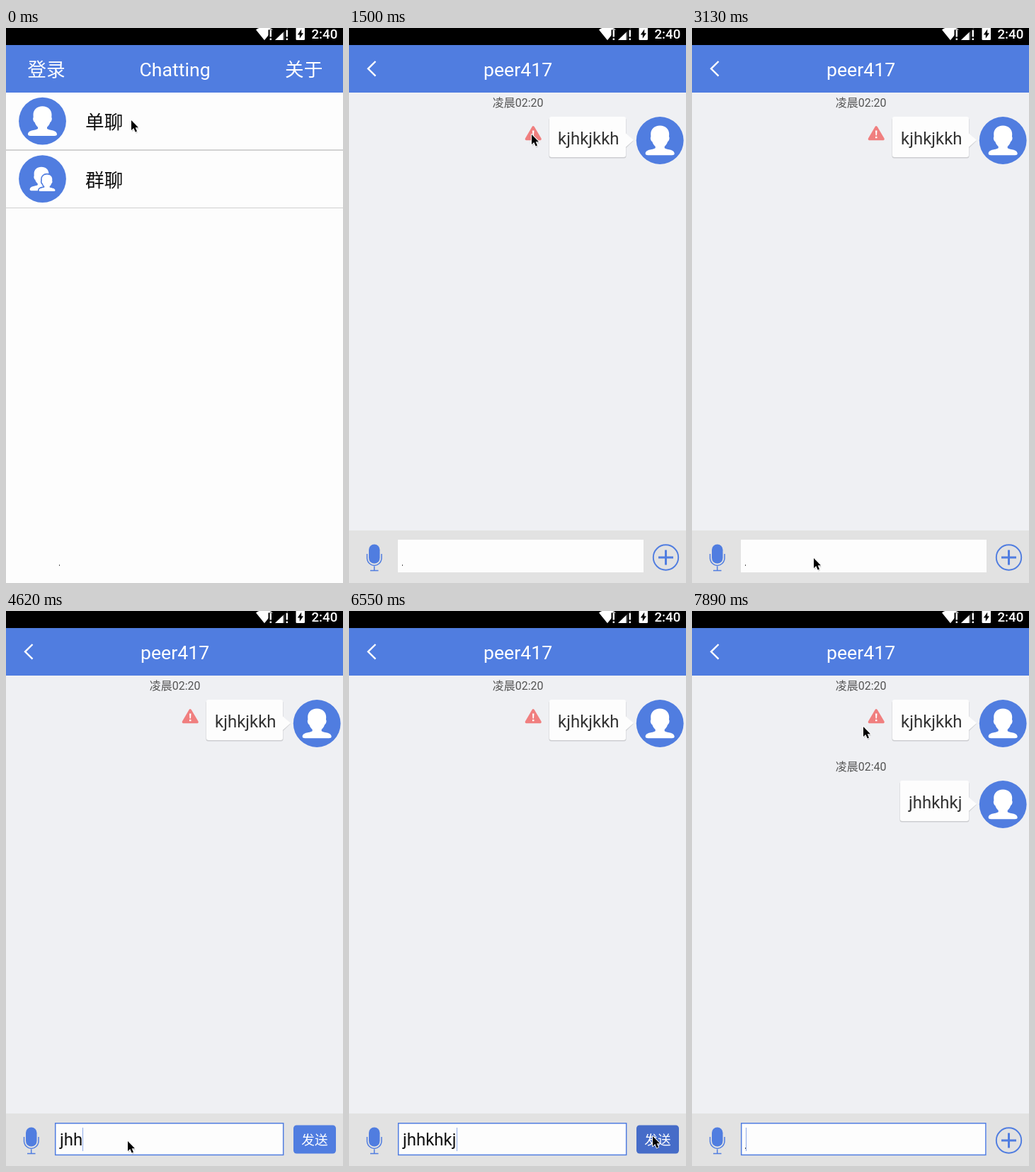
An HTML page for the animation above (8000 ms loop, 476x782 px).

```html
<!DOCTYPE html>
<html lang="zh-CN">
<head>
<meta charset="utf-8">
<title>Chatting</title>
<style>
:root { --blue: #507de0; }
html, body { margin: 0; width: 100%; height: 100%; overflow: hidden; background: #000; }
body { position: relative; font-family: Roboto, "Noto Sans CJK SC", "Noto Sans CJK", sans-serif; }
svg { position: absolute; left: 0; top: 0; display: block; }
.blue { fill: var(--blue); }
.line { fill: none; stroke: var(--blue); }
.white { fill: #fff; }
.big { font-size: 26.67px; }
.msg { font-size: 24px; fill: #333; }
.time { font-size: 16px; fill: #555; }
.mid { text-anchor: middle; }

/* 1% = 80 ms; every change is a hard step */
.anim, #typed { animation: 8s step-end -10ms infinite; }
#chat { animation-name: open; }
#wait { animation-name: wait; }
#name { animation-name: name; }
#focus { animation-name: focus; }
#plus { animation-name: plus; }
#send { animation-name: send; }
#press { animation-name: press; }
#sent { animation-name: sent; }
#mouse { animation-name: mouse; }

#typed {
  position: absolute; left: 73px; top: 728px; height: 33px; padding-left: 3px;
  overflow: hidden; white-space: nowrap;
  font-size: 24px; line-height: 35px; color: #111;
  border-right: 1px solid #8eabe9;
  animation-name: type, caret;
}

@keyframes open {
  0% { opacity: 0; transform: translateY(11px); }
  11.25% { opacity: .95; transform: translateY(11px); }
  13.125% { opacity: 1; transform: none; }
}
@keyframes wait { 0% { opacity: 1; } 13.125% { opacity: 0; } }
@keyframes name { 0% { opacity: 0; } 13.125% { opacity: 1; } }
@keyframes focus { 0% { opacity: 0; } 42.875% { opacity: 1; } }
@keyframes plus { 0% { opacity: 1; } 55.875% { opacity: 0; } 83.75% { opacity: 1; } }
@keyframes send { 0% { opacity: 0; } 55.875% { opacity: 1; } 83.75% { opacity: 0; } }
@keyframes press { 0% { fill: #507de0; } 81.875% { fill: #466cc8; } 83.75% { fill: #507de0; } }
@keyframes sent { 0% { opacity: 0; } 83.75% { opacity: 1; } }
@keyframes type {
  0% { width: 0; }
  55.875% { width: .79em; }
  57.75% { width: 1.345em; }
  59.625% { width: 1.85em; }
  61.375% { width: 2.905em; }
  63.25% { width: 3.15em; }
  83.75% { width: 0; }
}
@keyframes caret {
  0% { border-color: transparent; }
  42.875% { border-color: #8eabe9; }
  48.5% { border-color: transparent; }
  55.875% { border-color: #8eabe9; }
  68.875% { border-color: transparent; }
  76.25% { border-color: #8eabe9; }
  93.125% { border-color: transparent; }
  96.875% { border-color: #8eabe9; }
}
@keyframes mouse {
  0% { transform: translate(177px, 130px); }
  15% { transform: translate(200px, 135px); }
  16.875% { transform: translate(244px, 147px); }
  18.75% { transform: translate(258px, 150px); }
  26.125% { transform: translate(258px, 155px); }
  28% { transform: translate(258px, 800px); }
  31.625% { transform: translate(194px, 772px); }
  33.5% { transform: translate(182px, 752px); }
  35.375% { transform: translate(176px, 738px); }
  37.25% { transform: translate(173px, 743px); }
  39.125% { transform: translate(172px, 747px); }
  70.75% { transform: translate(205px, 738px); }
  72.625% { transform: translate(300px, 724px); }
  74.5% { transform: translate(390px, 722px); }
  76.25% { transform: translate(425px, 735px); }
  78.125% { transform: translate(429px, 740px); }
  85.625% { transform: translate(404px, 640px); }
  87.5% { transform: translate(310px, 390px); }
  89.375% { transform: translate(241px, 235px); }
  93.125% { transform: translate(240px, 208px); }
  95% { transform: translate(240px, 182px); }
  96.875% { transform: translate(241px, 168px); }
  98.625% { transform: translate(242px, 163px); }
}
</style>
</head>
<body>
<svg width="476" height="782" viewBox="0 0 476 782">
  <defs>
    <path id="person" d="M0-21C8-21 13-16 13-9C13-7 12.6-6 13-5C14-3 12.6 1 11 1.5C10 5 8 7 6.5 8.5V10.5C8 13 20.5 12 20.5 18.5C20.5 20 19 20.7 17 20.7H-17C-19 20.7-20.5 20-20.5 18.5C-20.5 12-8 13-6.5 10.5V8.5C-8 7-10 5-11 1.5C-12.6 1-14-3-13-5C-12.6-6-13-7-13-9C-13-16-8-21 0-21Z"/>
    <g id="avatar">
      <circle class="blue" r="33.4"/>
      <use href="#person" class="white"/>
    </g>
    <g id="side">
      <path d="M391 148.500L402 159L391 169.500Z" fill="#d3d4d7"/>
      <path d="M390 147.500L402 158L390 168.500Z" fill="#fdfdfd"/>
      <use href="#avatar" x="439.200" y="158.500"/>
    </g>
  </defs>

  <!-- list screen -->
  <g id="list">
    <rect width="476" height="782" fill="#fdfdfd"/>
    <rect class="blue" y="24" width="476" height="67"/>
    <g class="big white">
      <text x="30.300" y="68">登录</text>
      <text class="mid" x="238.600" y="68">Chatting</text>
      <text x="394" y="68">关于</text>
    </g>
    <g class="big" fill="#111">
      <text x="112" y="142">单聊</text>
      <text x="112" y="223.500">群聊</text>
    </g>
    <rect y="171" width="476" height="2" fill="#d2d2d2"/>
    <rect y="253" width="476" height="1" fill="#cfcfcf"/>
    <use href="#avatar" x="51.500" y="131.200"/>
    <g transform="translate(51.500 212.600)">
      <circle class="blue" r="33.400"/>
      <use href="#person" class="white" transform="translate(-1.500 0) scale(.8)"/>
      <g transform="translate(6.500 5.700) scale(.56)">
        <use href="#person" fill="#fff" stroke="#507de0" stroke-width="6" paint-order="stroke"/>
      </g>
    </g>
  </g>

  <!-- chat screen -->
  <g id="chat" class="anim">
    <rect y="-12" width="476" height="36"/>
    <rect class="blue" y="24" width="476" height="67"/>
    <rect y="91" width="476" height="617" fill="#eff0f3"/>
    <rect y="708" width="476" height="74" fill="#e2e2e2"/>
    <path d="M37.500 47L27 57.300L37.500 67.600" fill="none" stroke="#fff" stroke-width="2.400"/>
    <g class="big white mid">
      <text id="wait" class="anim" x="238.600" y="68">聊天</text>
      <text id="name" class="anim" x="238.600" y="68">peer417</text>
    </g>

    <text class="time mid" x="238.600" y="111">凌晨02:20</text>
    <rect x="282.500" y="126.500" width="109" height="57" rx="3" fill="#cdced1"/>
    <use href="#side"/>
    <rect x="283" y="125" width="108" height="57" rx="3" fill="#fdfdfd"/>
    <text class="msg" x="295" y="164">kjhkjkkh</text>
    <path d="M260.200 140L270 156.500H250.500Z" fill="#f07f7f" stroke="#f07f7f" stroke-width="3.600" stroke-linejoin="round"/>
    <path d="M259 144.500H261.500L261 151.500H259.500ZM259 153H261.500V155.300H259Z" class="white"/>

    <g id="sent" class="anim">
      <text class="time mid" x="238.600" y="225">凌晨02:40</text>
      <rect x="293.500" y="240.500" width="98" height="57" rx="3" fill="#cdced1"/>
      <use href="#side" y="114"/>
      <rect x="294" y="239" width="97" height="57" rx="3" fill="#fdfdfd"/>
      <text class="msg" x="306" y="278">jhhkhkj</text>
    </g>

    <!-- input bar -->
    <rect class="blue" x="28" y="727.500" width="15.500" height="27" rx="7.700"/>
    <path class="line" stroke-width="1.500" d="M25.500 741V747.500A10.300 11 0 0 0 46 747.500V741M35.700 758.500V764.500M30 764.500H41.500"/>
    <g id="plus" class="anim">
      <rect x="69" y="721" width="347" height="46" fill="#fdfdfd"/>
      <rect id="focus" class="line anim" x="69.700" y="721.800" width="345.200" height="44.600" stroke-width="1.500"/>
      <circle class="line" cx="447.500" cy="746" r="17.700" stroke-width="1.900"/>
      <path class="line" stroke-width="3" d="M437 746H458M447.500 735.500V756.500"/>
    </g>
    <g id="send" class="anim">
      <rect class="line" x="69.700" y="721.800" width="322" height="44.600" stroke-width="1.500" style="fill:#fdfdfd"/>
      <rect id="press" class="anim" x="406" y="724.500" width="60" height="40" rx="4.500"/>
      <text class="white mid" x="436" y="752" font-size="18.670">发送</text>
    </g>
  </g>

  <!-- status bar -->
  <rect width="476" height="24"/>
  <path class="white" d="M353 2.500Q365-6 377 2.500L365 17.300Z"/>
  <path d="M370.500 2.500H378V18H370.500Z"/>
  <path class="white" d="M372.600 3H375V12.500H372.600ZM372.600 14.600H375V17H372.600Z"/>
  <path d="M380 17L398 0V17Z" fill="#4a4a4a"/>
  <path class="white" d="M380 17L391.500 6V17Z"/>
  <path d="M393.500 2.500H400V18H393.500Z"/>
  <path class="white" d="M395.600 3H398V12.500H395.600ZM395.600 14.600H398V17H395.600Z"/>
  <rect class="white" x="409.500" y="-2" width="12.500" height="19" rx="1.200"/>
  <path d="M417.200 1.800L411.800 9.500H414.800V14.800L420 7.200H417.200Z"/>
  <text class="white" x="431.500" y="15.200" font-size="18.670" font-weight="500">2:40</text>
</svg>

<div id="typed">jhhkhkj</div>

<svg width="476" height="782" viewBox="0 0 476 782">
  <g id="mouse" class="anim">
    <path d="M1 2V16L4 13.500L6.500 18.500L9 17.500L7 12.500H11Z" opacity=".18"/>
    <path d="M0 0V14L3.300 11L5.700 16.500L8 15.500L5.700 10.200H10Z" stroke="#fff" stroke-width="1.800" stroke-linejoin="round" paint-order="stroke"/>
  </g>
</svg>
</body>
</html>
```
